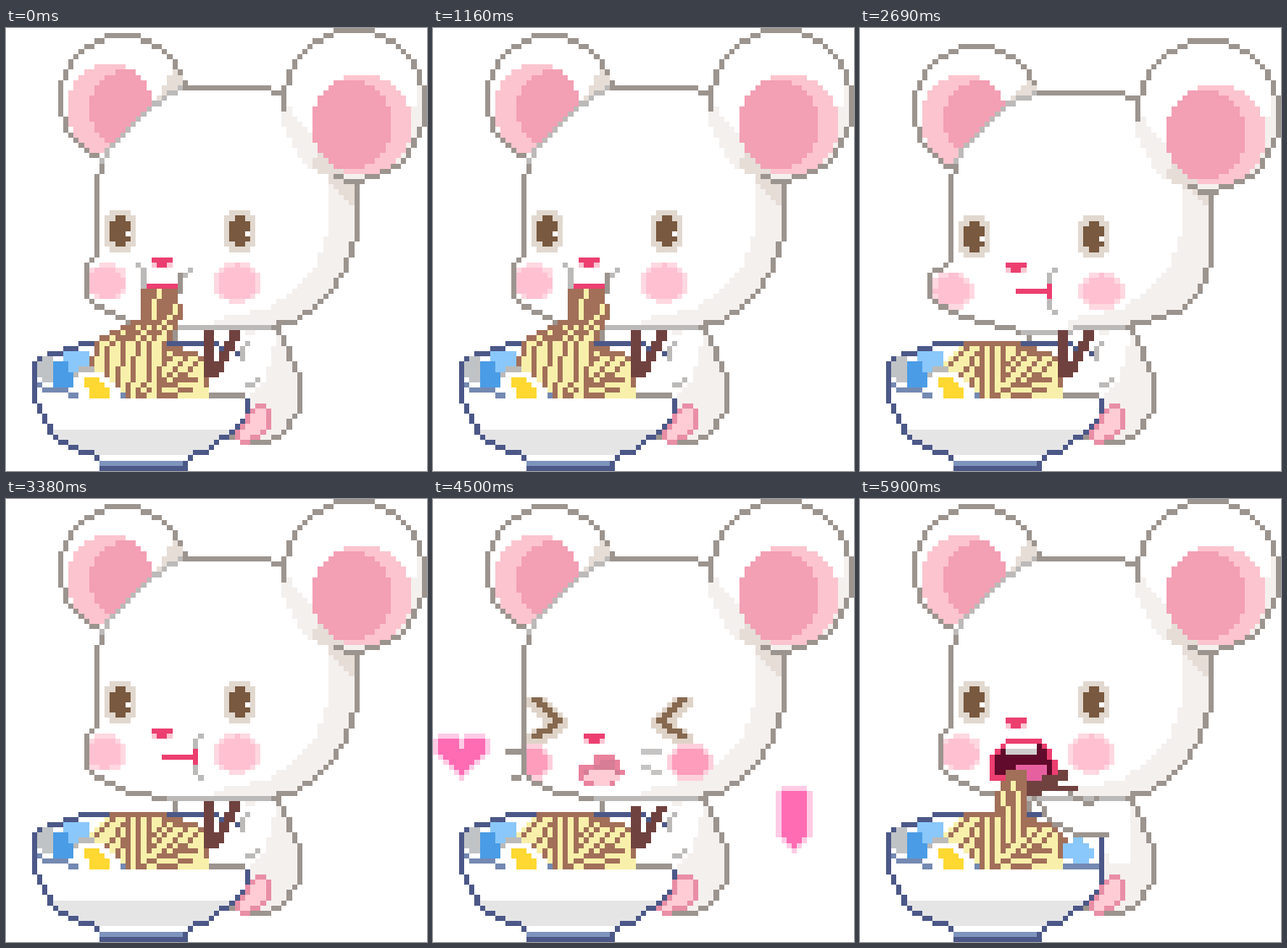
Recreate the animation shown at these times as an HTML page with a canvas. Size 500 by 525 pixels, loop 6000 ms.

```html
<!DOCTYPE html>
<html lang="en">
<head>
<meta charset="utf-8">
<title>Noodle mouse</title>
<style>
html, body { margin: 0; width: 100%; height: 100%; overflow: hidden; background: #fff; }
canvas { display: block; width: 500px; height: 525px; image-rendering: pixelated; }
</style>
</head>
<body>
<canvas id="stage" width="81" height="85"></canvas>
<script>
const W = 81, H = 85, LOOP = 6000;
const ctx = document.getElementById('stage').getContext('2d');
const GRAY = '#9c948e', SOFT = '#bcbab9', SHADE = '#f4f0ee', BEIGE = '#e6ddd6';
const LIGHT = '#fcc4ce', ROSE = '#f39fb4', RED = '#ec3f70', NAVY = '#4c5888';
const PASTA = '#f8f0aa', BROWN = '#a26f59', STICK = '#70423f', BLUE = '#4a9ce6', SKY = '#8ac7fa';

// Shapes are tests on cells; put() paints them, with an optional one-cell edge.
const ell = (cx, cy, rx, ry) => (x, y) =>
  ((x + .5 - cx) / rx) ** 2 + ((y + .5 - cy) / ry) ** 2 <= 1;

function poly(text) {
  const n = text.split(' ').map(Number);
  return (x, y) => {
    let hit = false;
    const px = x + .5, py = y + .5;
    for (let i = 0, j = n.length - 2; i < n.length; j = i, i += 2) {
      if ((n[i + 1] > py) !== (n[j + 1] > py) &&
          px < (n[j] - n[i]) * (py - n[i + 1]) / (n[j + 1] - n[i + 1]) + n[i]) hit = !hit;
    }
    return hit;
  };
}

const both = (a, b) => (x, y) => a(x, y) && b(x, y);
const grow = p => (x, y) => p(x, y) || p(x - 1, y) || p(x + 1, y) || p(x, y - 1) || p(x, y + 1);

function box(color, x, y, w = 1, h = 1) {
  ctx.fillStyle = color;
  ctx.fillRect(x, y, w, h);
}

function put(p, fill, edge) {
  for (let y = 0; y < H; y++) for (let x = 0; x < W; x++) {
    if (!p(x, y)) continue;
    let c = fill;
    if (edge && !(p(x - 1, y) && p(x + 1, y) && p(x, y - 1) && p(x, y + 1))) {
      c = typeof edge === 'function' ? edge(x, y) : edge;
    }
    if (c) box(c, x, y);
  }
}

function line(color, pts, w = 1, h = 1) {
  for (let i = 0; i + 3 < pts.length; i += 2) {
    const dx = pts[i + 2] - pts[i], dy = pts[i + 3] - pts[i + 1];
    const n = Math.ceil(Math.max(Math.abs(dx), Math.abs(dy))) || 1;
    for (let k = 0; k <= n; k++) {
      box(color, Math.round(pts[i] + dx * k / n), Math.round(pts[i + 1] + dy * k / n), w, h);
    }
  }
}

const mix = (a, b, t) => a.map((v, i) => v + (b[i] - v) * t);

function strands(left, right, count) {
  for (let i = 0; i <= 40; i++) line(PASTA, mix(left, right, i / 40));
  for (let i = 0; i <= count; i++) line(BROWN, mix(left, right, i / count));
}

function body() {
  put(poly('32 56 52 56 54 60 56 65 57 67 57 73 55 76 53 79 49 80 44 79 32 70'), SHADE, GRAY);
  put(poly('33 57 46 57 45 70 33 70'), '#fff');
}

function leftEar(y) {
  put(ell(22.5, 13.6 + y, 12.5, 12.6), '#fff', GRAY);
  put(poly(`31 ${10 + y} 33 ${8 + y} 34 ${10 + y} 34 14 29 14`), BEIGE);
  const inner = ell(20, 15.7 + y, 8.1, 8.8);
  put(inner, LIGHT);
  put(both(inner, ell(23.7, 15.5 + y, 7.7, 7.6)), ROSE);
}

function rightEar(y) {
  const ear = ell(67, 14.8 + y, 14, 14.8);
  put(ear, SHADE);
  put(both(ear, ell(66.5, 11.5 + y, 12.5, 11)), '#fff');
  put(both(ear, ell(63, 26 + y, 4, 3)), BEIGE);
  const inner = both(ell(68.5, 18.6 + y, 9.8, 9.6), x => x > 58);
  put(inner, LIGHT);
  put(both(inner, ell(66, 18.6 + y, 8.4, 8.6)), ROSE);
  put(ear, null, (cx, cy) => cx < 63 && cy > 15 + y ? null : GRAY);
}

const cheek = (head, x, y, rx, ry, color, rim) => {
  put(both(head, ell(x, y, rx, ry)), rim);
  put(both(head, ell(x, y, rx - .8, ry - .6)), color);
};

function head(s) {
  const { bulge, face: d, squash: q } = s;
  const shape = poly(`34 ${11 + q} 49 ${11 + q} 54 ${12 + q} 63 18 67 25 68 30 68 ${39 + 6 * q} ` +
    `66 ${46 + 5 * q} 63 ${51 + 3 * q} 56 56.6 50 58 32 ${58 + q} 24 57 18 ${54 + q} ` +
    `${bulge} ${51 + d} ${bulge} ${46 + d} 17 ${44 + d} 17 30 18 26 20 22 25 18 29 14`);
  put(shape, '#fff');
  put(both(shape, poly('62 26 62 38 60 45 56 50 50 54 40 56 40 58 56 58 68 50 68 28')), SHADE);
  put(both(shape, poly('62 29 68 29 68 34 66 34')), BEIGE);
  const [lx, rx, y] = s.cheeks;
  if (s.happy) {
    cheek(shape, lx, y, 3.6, 3.4, '#ff9dbc', '#ffcfdc');
    cheek(shape, rx, y, 4.6, 3.5, '#ff9dbc', '#ffcfdc');
  } else {
    cheek(shape, lx, y, 4.2, 3.6, '#ffc1d2', '#ffd8e1');
    cheek(shape, rx, y, 4.7, 4 - q / 2, '#ffc1d2', '#ffd8e1');
  }
  put(shape, null, (x, y) => x < 34 && y < 26 || y > 56 && x > 30 && x < 51 ? SOFT : GRAY);
}

function eye(x, y, glint) {
  put(ell(x + 3, y + 4, 3.2, 4.2), '#e1d8cf');
  box('#79593f', x + 1, y + 2, 4, 4);
  box('#79593f', x + 2, y + 1, 2, 6);
  box('#fff', x + glint, y + 4);
}

function nose(x, y) {
  box('#fbc6d3', x, y + 1, 4);
  box(RED, x, y, 4);
  box(RED, x + 1, y + 1, 2);
}

function happyFace(d) {
  const eyes = [[19, 38, 23, 42, 19, 45], [47, 38, 43, 42, 47, 45]]
    .map(e => e.map((v, i) => i % 2 ? v + d : v));
  eyes.forEach(e => line('#dfd3c8', e.map((v, i) => i % 2 ? v : v - 1), 4, 2));
  eyes.forEach(e => line('#86694f', e, 2, 1));
  nose(29, 45 + d);
  put(poly(`28 ${51 + d} 31 ${51 + d} 31 ${49 + d} 35 ${49 + d} 36 ${51 + d} 37 ${52 + d} ` +
    `36 ${54 + d} 34 ${55 + d} 30 ${55 + d} 28 ${53 + d}`), '#d77d96', '#e9829d');
  put(ell(32.5, 53.2 + d, 3.2, 1.5), '#ffccd6');
  line(GRAY, [14, 48 + d, 16, 48 + d]);
  line(GRAY, [15, 53 + d, 17, 52 + d]);
  line('#c6c4c3', [40, 48 + d, 43, 48 + d]);
  line('#c6c4c3', [40, 51 + d, 41, 51 + d, 43, 52 + d]);
}

function pucker(d) {
  box(SOFT, 25, 45 + d);
  box(SOFT, 26, 46 + d, 1, 4);
  box(SOFT, 35, 46 + d);
  box(GRAY, 33, 47 + d, 1, 4);
  box(SOFT, 34, 47 + d);
  box(RED, 27, 49 + d, 6);
  box(RED, 32, 50 + d);
}

function chewMouth(d) {
  box(RED, 30, 49 + d, 6);
  box(RED, 36, 48 + d, 1, 3);
  box(SOFT, 37, 45 + d);
  box(SOFT, 36, 46 + d, 1, 2);
  box(SOFT, 36, 51 + d, 1, 2);
  box(SOFT, 37, 53 + d);
}

function openMouth() {
  put(poly('29 46 34 46 37 48 38 51 38 54 25 54 25 50 27 47'), '#610a2b', RED);
  box('#fff', 28, 47, 6);
  box('#d0cdce', 28, 48, 6);
  put(ell(32.8, 52.5, 3.6, 1.6), '#e660a0');
}

function bowl(lifted) {
  const shape = poly('5 65 7 63 12 61 16 60 40 60 45 62 47 65 47 74 45 77 42 79 38 82 ' +
    '35 83 35 85 18 85 18 83 13 81 9 79 7 75 5 71');
  put(shape, '#fff', NAVY);
  put(both(shape, poly('8 77 45 77 42 79 36 82 17 82 11 79')), '#e5e5e6');
  put(shape, null, NAVY);
  box('#7e94bd', 18, 83, 16);
  put(poly('6 65 8 63 10 64 9 68 6 67'), '#c0c3c6');
  put(poly('9 64 13 63 13 69 9 69'), BLUE);
  put(poly('10 63 13 62 16 62 16 66 13 67 12 64'), SKY);
  if (lifted) put(poly('39 66 43 65 46 68 43 70 39 69'), SKY);
  line('#7489b2', [6, 68, 8, 69, 11, 69, 12, 70, 45, 70]);
  put(poly('14 65 19 65 22 69 22 71 14 71 13 67'), '#fff', (x, y) => y < 67 ? SOFT : '#fff');
  put(poly('15 67 18 67 20 69 20 71 16 71 16 69 15 69'), '#ffd831');
}

function pile() {
  put(poly('20 61 32 61 36 63 39 65 39 71 23 71 20 67 16 65 18 62'), PASTA);
  [[17, 64, 20, 61], [19, 66, 22, 62], [21, 68, 22, 65], [20, 60, 30, 60], [30, 61, 36, 62, 39, 65],
   [23, 61, 23, 70], [25, 61, 25, 70], [27, 61, 27, 67], [28, 66, 33, 61], [30, 67, 35, 62],
   [32, 67, 36, 64], [28, 64, 30, 62], [26, 70, 29, 68, 36, 67], [29, 70, 35, 69], [38, 65, 38, 68]]
    .forEach(p => line(BROWN, p));
}

function arm(lifted, reach) {
  if (lifted) {
    put(poly('33 58 52 58 52 70 48 70 47 65 41 65 36 61'), '#fff');
    line(GRAY, [33, 57, 36, 61, 41, 64, 47, 64]);
    line(GRAY, [40, 56, 43, 58, 45, 57]);
  } else {
    put(poly('45 59 52 58 51 64 49 69 46 71 40 71 42 67 45 64'), '#fff');
    line(SOFT, [46, 60, 45, 61, 45, 63]);
    line(SOFT, [46, 68, 48, 67]);
    line(GRAY, [39, 70, 45, 70]);
  }
  put(poly(`${47 - reach} 73 49 72 51 73 51 76 49 79 ${45 - reach} 80 ${44 - reach} 78 46 76`),
    '#ffccd5', '#e98ea6');
}

function heart(cx, cy, size, turn) {
  const flat = turn < 1;
  const shape = (x, y) => {
    const X = Math.abs(x + .5 - cx) / (size * turn), Y = (y + .5 - cy) / size;
    if (Y >= 0) return X < Math.min(4.8, (5 - Y) * (flat ? 4 : 1));
    return flat ? X < 4.8 && Y > -2.6 : (X - 2.4) ** 2 + Y * Y < 6;
  };
  put(grow(shape), '#ffcbe5');
  put(shape, '#ff6cb3');
}

function state(t) {
  if (t < 2420) {
    const i = [100, 180, 280, 380, 480, 580].findIndex(end => t % 580 < end);
    const face = [0, -2, -3, -3, -2, -1][i];
    return { mode: 'eat', ear: [0, 1, 2, 2, 1, 0][i], face, squash: 0,
      bulge: 15 - face / 3, cheeks: [19.3 - face / 6, 44.5, 48.8 + face] };
  }
  if (t < 3500) {
    const q = (t - 2420) % 270 < 150 ? 1 : 0;
    return { mode: 'chew', ear: 2 * q, face: q, squash: q, bulge: 15 - 2 * q,
      cheeks: [19 - 1.2 * q, 44.5 + 2 * q, 48.8 + 1.6 * q] };
  }
  if (t < 5300) {
    const n = Math.floor((t - 3500) / 100), ear = [2, 1, 0, 1][n % 4];
    const face = ear > 1 ? -1 : 0;
    return { mode: 'happy', happy: true, ear, face, squash: 0, bulge: 17, n,
      hearts: t >= 4000, cheeks: [19.3, 49.6, 50.5 + face] };
  }
  return { mode: 'grab', ear: 0, face: 0, squash: 0, bulge: 15,
    n: Math.floor((t - 5300) / 100), cheeks: [19.3, 44.5, 48.8] };
}

function draw(s) {
  const d = s.face, grab = s.mode === 'grab', lifted = grab && s.n > 1;
  ctx.fillStyle = '#fff';
  ctx.fillRect(0, 0, W, H);
  body();
  leftEar(s.ear);
  head(s);
  rightEar(s.ear);

  if (s.happy) happyFace(d);
  else {
    const look = grab && s.n < 2 ? 1 : 0;
    eye(19, 35 + d + look, 4);
    eye(42, 35 + d + look, 4);
    nose(28, (lifted ? 42 : 44) + d);
  }
  if (s.mode === 'eat') pucker(d);
  if (s.mode === 'chew') chewMouth(d);
  if (grab) s.n > 2 ? openMouth() : box(RED, 28, 49, 5);

  bowl(lifted);
  pile();
  if (s.mode === 'eat') {
    const k = -d / 3;
    strands(mix([26, 50, 26, 55, 17, 60, 16, 64], [26, 47, 25, 57, 20, 60, 17, 65], k),
      mix([32, 50, 33, 55, 30, 60, 29, 69], [32, 47, 34, 54, 34, 60, 31, 66], k), 5);
  }
  if (!lifted) {
    const top = s.happy ? 59 : 58;
    line(STICK, [38, top, 38, 66], 2);
    line(STICK, [43, top, 39, 66], 2);
  }
  arm(lifted, s.hearts ? 1 : 0);
  if (lifted) {
    const top = 64 - 2 * s.n;
    line(STICK, [32, top + 2, 36, top + 1, 39, top], 1, 2);
    line(STICK, [32, top + 4, 37, top + 3, 41, top + 3]);
    strands([28, top, 26, top + 5, 25, 64], [31, top, 31, top + 5, 31, 64], 3);
  }
  if (s.hearts) {
    const spin = [1, .7, .36, .7];
    heart(5.5, 48.3, 1, spin[(s.n + 2) % 4]);
    heart(69.5, 59.6, 1.45, spin[s.n % 4]);
  }
}

let last = '';
function tick() {
  const s = state(performance.now() % LOOP), key = JSON.stringify(s);
  if (key !== last) {
    draw(s);
    last = key;
  }
  requestAnimationFrame(tick);
}
tick();
</script>
</body>
</html>
```
